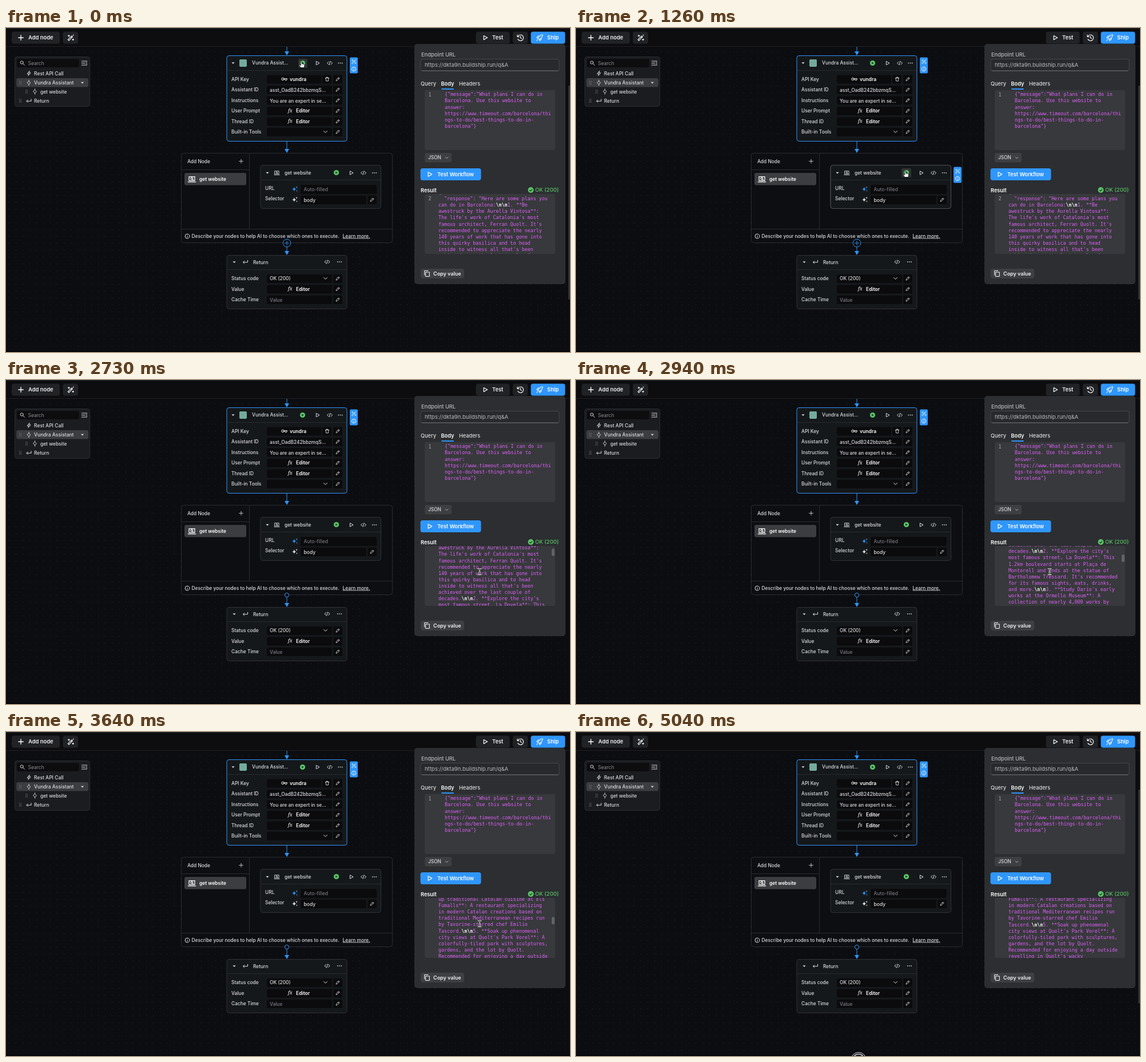
Write an HTML page that moves like this. It is 986x568 px and loops after 5110 ms.

```html
<!DOCTYPE html>
<html lang="en">
<head>
<meta charset="utf-8">
<title>Workflow editor</title>
<style>
html, body { margin: 0; width: 100%; height: 100%; overflow: hidden; background: #0c0d10; }
svg { display: block; width: 100vw; height: 100vh; }
text { font-family: Inter, sans-serif; white-space: pre; }
.mono { font-family: "DejaVu Sans Mono", monospace; }
.serif { font-family: "Noto Serif", serif; font-style: italic; }
.icon { fill: none; stroke-linecap: round; stroke-linejoin: round; }
</style>
</head>
<body>
<svg id="stage" viewBox="0 0 986 568"></svg>
<script>
const BLUE = '#2f96fb', GREEN = '#5ac466', LINE = '#292b2f', NODE = '#15181a',
      FIELD = '#0b0b0e', TEXT = '#dcdde0', PINK = '#dc60f8';

const ICONS = {
  play: 'M-2.3-3L3 0-2.3 3Z',
  code: 'M-2-2.5L-4.5 0-2 2.5M2-2.5L4.5 0 2 2.5M.8-3.2L-.8 3.2',
  chevron: 'M-3-1.5L0 1.5 3-1.5',
  pencil: 'M-3 3L-2.5 .9 1.6-3.2 3.2-1.6-.9 2.5ZM.4-2L2-.4',
  plus: 'M-4 0H4M0-4V4',
  wand: 'M-4.5 3.3L1.8-3 3.3-1.5-3 4.8ZM.3-1.5L1.8 0M-3-4.5V-1.9M-4.3-3.2H-1.7M4 2V4.4M2.8 3.2H5.2M4.4-5V-3.6',
  history: 'M-4.6-1.5A4.9 4.9 0 1 1-4.3 2.5M-5.2-4.6V-1.4H-2M0-2.6V.3L2 1.5',
  rocket: 'M-2.8.6C-.8-3.6 2-5 5-5 5-2 3.6.8-.6 2.8ZM-2.8.6L-5 .3-3-2.6H-.9M-.6 2.8L-.3 5 2.6 3V.9M-3.2 2.6L-5 5M1.5-1.6h.1',
  search: 'M1.3-1A2.6 2.6 0 1 1-3.9-1A2.6 2.6 0 1 1 1.3-1M.7 1L3.5 3.8',
  fold: 'M-4.5-3.4H4.5M-4.5 0H1M-4.5 3.4H4.5M4.7-1.7L2.8 0 4.7 1.7',
  bolt: 'M1-4L-3 .8H-.3L-1 4 3-.8H.3Z',
  diamond: 'M0-2.8L2.8 0 0 2.8-2.8 0ZM0-4.7V-2.8M0 2.8V4.7',
  enter: 'M4-2.8V.7H-4M-1.8-1.5L-4 .7-1.8 2.9',
  laptop: 'M-4-3.6H4V2H-4ZM-5.3 3.8H5.3M1.2-1A1.4 1.4 0 1 1-1.6-1A1.4 1.4 0 1 1 1.2-1M.8 0L2 1.1',
  trash: 'M-2.4-1.8L-2 3.4H2L2.4-1.8M-3.2-1.9H3.2M-1-1.9V-3.3H1V-1.9',
  key: 'M-.4 0A2.2 2.2 0 1 1-4.8 0A2.2 2.2 0 1 1-.4 0M-.4-.9H4.8V.9H3.8V2.2H2.2V.9H-.4M-2.6 0h.1',
  info: 'M4 0A4 4 0 1 1-4 0A4 4 0 1 1 4 0M0-.3V2M0-2h.01',
  copy: 'M-2-2.5H4.2V5H-2ZM-4.4 2.6V-5H1.8'
};
const FILLED = {
  caret: 'M-2.6-1.2H2.6L0 1.6Z',
  dots: 'M-4-.8h1.6v1.6h-1.6ZM-.8-.8h1.6v1.6h-1.6ZM2.4-.8h1.6v1.6h-1.6Z',
  grip: 'M-1.8-3h1.2v1.2h-1.2ZM.6-3h1.2v1.2H.6ZM-1.8-.6h1.2V.6h-1.2ZM.6-.6h1.2V.6H.6ZM-1.8 1.8h1.2V3h-1.2ZM.6 1.8h1.2V3H.6Z',
  sparkle: 'M-1.2-3.6Q-.7 0 2.6.6-.7 1.2-1.2 4.6-1.7 1.2-5 .6-1.7 0-1.2-3.6ZM3-4.8Q3.2-3 4.8-2.8 3.2-2.6 3-.8 2.8-2.6 1.2-2.8 2.8-3 3-4.8ZM3.3 2Q3.4 3.2 4.6 3.4 3.4 3.6 3.3 4.8 3.2 3.6 2 3.4 3.2 3.2 3.3 2Z'
};

const esc = s => s.replace(/&/g, '&amp;').replace(/</g, '&lt;');
const text = (x, yc, s, size = 8.4, weight = 500, fill = TEXT, extra = '') =>
  `<text x="${x}" y="${yc + size * .36}" font-size="${size}" font-weight="${weight}" fill="${fill}" ${extra}>${esc(s)}</text>`;
const rect = (x, y, r, b, fill, radius = 0, stroke = 'none') => {
  const inset = stroke === 'none' ? 0 : .5;
  return `<rect x="${x + inset}" y="${y + inset}" width="${r - x - 2 * inset}" height="${b - y - 2 * inset}" rx="${radius}" fill="${fill}" stroke="${stroke}"/>`;
};
const icon = (name, x, y, color = TEXT, scale = 1, width = 1) => {
  const at = `transform="translate(${x} ${y}) scale(${scale})"`;
  return FILLED[name] ? `<path ${at} d="${FILLED[name]}" fill="${color}"/>`
    : `<path class="icon" ${at} d="${ICONS[name]}" stroke="${color}" stroke-width="${width}"/>`;
};
const stroke = (d, color = LINE, width = 1) => `<path d="${d}" fill="none" stroke="${color}" stroke-width="${width}"/>`;
const group = (id, body, attrs = '') => `<g id="${id}" ${attrs}>${body}</g>`;
const arrow = (from, to) => stroke(`M491 ${from}V${to - 5}`, BLUE) +
  `<path d="M487 ${to - 7}h8l-4 7Z" fill="${BLUE}"/>`;
const code = (x, yc, line) => {
  const parts = esc(line).split('\\n\\n').join('<tspan fill="#fff" font-weight="700">\\n\\n</tspan>');
  return `<text class="mono" x="${x}" y="${yc + 3}" font-size="8.36" fill="${PINK}">${parts}</text>`;
};
const lineNumber = (y, n) => text(738.5, y, n, 8.36, 400, '#a9aaad', 'class="mono"');
const runButton = (x, y) => `<circle cx="${x}" cy="${y}" r="4.6" fill="${GREEN}"/>` +
  `<path d="M${x - 1.3} ${y - 2.1}l3.5 2.1-3.5 2.1Z" fill="#12321a"/>`;
const pencilButton = y0 => x0 => rect(x0, y0 - 7, x0 + 16, y0 + 8, FIELD, 2) + icon('pencil', x0 + 8, y0, TEXT, .95, .9);
const sideTools = (x, y) => rect(x, y - .5, x + 14, y + 27.5, BLUE, 2) +
  icon('wand', x + 7, y + 7, '#fff', .75) + icon('info', x + 7, y + 20, '#fff', .9);

function fieldRow(y, label, kind, value) {
  let out = text(394, y, label) + rect(456, y - 7, kind === 'key' ? 551 : 570, y + 8, FIELD, 2) + pencilButton(y)(572);
  if (kind === 'key') {
    out += icon('key', 486.5, y, '#fff', 1, .9) + text(496, y, value, 8.6, 600, '#fff') +
      rect(553, y - 7, 569, y + 8, FIELD, 2) + icon('trash', 561.5, y, TEXT, 1, .9);
  } else if (kind === 'editor') {
    out += text(493, y - .5, 'fx', 9, 400, '#fff', 'class="serif"') + text(507, y, 'Editor', 8.5, 600, '#fff');
  } else {
    out += text(461, y + (kind === 'select' ? 0 : 1), value, 8.4, 500, kind === 'empty' ? '#7c7e83' : TEXT);
  }
  return kind === 'select' ? out + icon('chevron', 558.5, y) : out;
}

function topBar() {
  return rect(0, 0, 986, 33, '#0d0d10') + rect(0, 0, 986, 1, '#292a2e') + rect(0, 32, 986, 33, '#202125') +
    rect(10, 6.5, 94, 27.5, '#202225', 4) + icon('plus', 26, 17, '#fff', 1.05, 1.3) + text(39, 17, 'Add node', 9.4, 600, '#f2f2f4') +
    rect(99.5, 6.5, 126, 27.5, '#202225', 4) + icon('wand', 113, 17, '#fff', 1.05, 1.1) +
    rect(821.5, 6.5, 880.5, 27.5, '#202225', 4) + icon('play', 838, 17, '#fff', 1.2) + text(850, 17, 'Test', 9.3, 600, '#f2f2f4') +
    rect(886, 6.5, 912.5, 27.5, '#202225', 4) + icon('history', 899.5, 17, '#fff', 1.05, 1.1) +
    rect(917.5, 6.5, 977.5, 27.5, BLUE, 4) + icon('rocket', 933, 17, '#fff', 1.05) + text(946, 17, 'Ship', 9.5, 600, '#fff');
}

function outline() {
  return rect(15, 50, 147, 138, '#1a1c1f', 4, '#2b2d31') + rect(19, 54, 128, 69, '#0d0d10', 3) +
    icon('search', 29, 61.5) + text(38.5, 61.5, 'Search', 8.5, 400, '#8d8f94') + icon('fold', 137, 61.5) +
    rect(18, 88, 144, 103.5, '#3b3d40', 3) +
    icon('bolt', 40, 79.5) + text(49, 79.5, 'Rest API Call', 8.5) +
    icon('grip', 25, 96, '#77797e') + icon('diamond', 40, 96) + text(49, 95.5, 'Vundra Assistant', 8.5) + icon('caret', 133.5, 96) +
    icon('grip', 36, 111.5, '#77797e') + icon('diamond', 50.5, 111.5) + text(60, 111.5, 'get website', 8.4) +
    icon('grip', 25, 127.5, '#77797e') + icon('enter', 40, 127.5) + text(49, 127.5, 'Return', 8.4);
}

function assistantNode() {
  return rect(385.5, 48, 596.5, 199, NODE, 4, BLUE) + stroke('M386.5 74.5H595.5') +
    icon('caret', 397, 61.5) + rect(408, 55, 421, 68, '#74aa9c', 2) + text(430, 61, 'Vundra Assist...', 8.4) +
    group('hover1', rect(511, 54, 527, 70, '#303235', 2)) + runButton(518.5, 61.5) +
    icon('play', 545, 61.5) + icon('code', 566, 61.5) + icon('dots', 584.5, 61.5) +
    fieldRow(89.5, 'API Key', 'key', 'vundra') +
    fieldRow(108, 'Assistant ID', 'value', 'asst_OadB242bbzmqS...') +
    fieldRow(126.5, 'Instructions', 'value', 'You are an expert in se...') +
    fieldRow(145, 'User Prompt', 'editor') + fieldRow(163.5, 'Thread ID', 'editor') +
    fieldRow(182, 'Built-in Tools', 'select', '') + sideTools(601, 52);
}

function toolGroup() {
  return rect(306, 219, 676, 377, '#0d0e11', 4, LINE) + stroke('M425.5 219V352M307 248.5H425M307 352.5H675') +
    text(317, 233.5, 'Add Node') + icon('plus', 411, 233.5, TEXT, .85) +
    rect(312, 254, 420, 275.5, '#3b3d40', 3) + icon('laptop', 325, 265, '#fff', 1.25) + text(338, 264.5, 'get website', 8.4, 600, '#fff') +
    rect(444.5, 240, 656, 317, NODE, 4, '#303236') +
    group('nodeHover', rect(444.5, 240, 656, 317, 'none', 4, '#4c4f54') + sideTools(660, 244)) +
    stroke('M446 266.5H655') + icon('caret', 457, 254) + icon('laptop', 473.5, 254, TEXT, .9) + text(487, 253.5, 'get website') +
    group('hover2', rect(569, 246, 586, 262, '#303235', 2)) + runButton(577.5, 253.5) +
    icon('play', 604, 254) + icon('code', 625, 254) + icon('dots', 644, 254) +
    text(453, 280.5, 'URL') + icon('sparkle', 505, 282, BLUE) + rect(515, 275, 648, 291, FIELD, 2) +
    text(520.5, 283, 'Auto-filled', 8.6, 400, '#85878c') +
    text(453, 299, 'Selector') + icon('sparkle', 505, 300.5) + rect(515, 294, 630, 309, FIELD, 2) + text(520.5, 301.5, 'body', 8.6) +
    pencilButton(301)(632) +
    icon('info', 317, 365) + text(324.5, 364.5, 'Describe your nodes to help AI to choose which ones to execute.', 8.35) +
    text(588.5, 364.5, 'Learn more.', 8.35, 500, TEXT, 'text-decoration="underline"');
}

function returnNode() {
  return rect(385.5, 398, 596.5, 493, NODE, 4, '#303236') + stroke('M387 423.5H596') +
    icon('caret', 399, 410.5) + icon('enter', 418.5, 410) + text(432, 410.5, 'Return') + icon('code', 561.5, 410) + icon('dots', 583, 410) +
    fieldRow(439, 'Status code', 'select', 'OK (200)') + fieldRow(457.5, 'Value', 'editor') +
    fieldRow(476, 'Cache Time', 'empty', 'Value');
}

const REQUEST = `{"message":"What plans I can do in
Barcelona. Use this website to
answer:
https://www.timeout.com/barcelona/thi
ngs-to-do/best-things-to-do-in-
barcelona"}`.split('\n');

const RESPONSE = String.raw`{
  "response": "Here are some plans you
can do in Barcelona:\n\n1. **Be
awestruck by the Aurella Vintosa**:
The life's work of Catalonia's most
famous architect, Ferran Quolt. It's
recommended to appreciate the nearly
140 years of work that has gone into
this quirky basilica and to head
inside to witness all that's been
achieved over the last couple of
decades.\n\n2. **Explore the city's
most famous street, La Dovela**: This
1.2km boulevard starts at Plaça de
Montorell and ends at the statue of
Bartholomew Tressard. It's recommended
for its famous sights, eats, drinks,
and more.\n\n3. **Study Dario's early
works at the Ormello Museum**: A
collection of nearly 4,000 works by
Dario Ormello showcasing the artist's
formative years and the evolution of
his style.\n\n4. **Stop by and fill
up traditional Catalan cuisine at Els
Fumalls**: A restaurant specializing
in modern Catalan creations based on
traditional Mediterranean recipes run
by Tavorine-starred chef Emilio
Tascord.\n\n5. **Soak up phenomenal
city views at Quolt's Park Vorel**: A
colorfully-tiled park with sculptures,
gardens, and the lot by Quolt.
Recommended for enjoying a day outside
revelling in Quolt's wacky
architecture.`.split('\n');

function testPanel() {
  const pitch = 11.13;
  const response = RESPONSE.map((line, i) => code(756, 299 + pitch * (i - 1), line)).join('') +
    lineNumber(299 - pitch, '1') + lineNumber(299, '2');
  return rect(714, 28, 978, 449, '#2c2e31', 5) +
    text(726, 46.5, 'Endpoint URL', 9.3, 500, '#b6b8bc') + rect(724.5, 54, 967.5, 75.5, '#27292c', 3, '#45474b') +
    stroke('M727 75H965.5', '#6c6e73') + text(732, 65, 'https://dkta9n.buildship.run/q&A', 9.5, 400, '#b9bbbf') +
    text(725, 97.5, 'Query', 9.2, 500) + text(760.5, 97.5, 'Body', 9.2, 600, '#fff') + text(792, 97.5, 'Headers', 9.2, 500) +
    rect(761, 106, 783, 108, BLUE, 1) + rect(732, 109, 960, 214, '#38393c', 3) + lineNumber(116.5, '1') +
    REQUEST.map((line, i) => code(767, 116.3 + 11.1 * i, line)).join('') +
    rect(732, 219, 779, 235.5, '#3d3f43', 3) + text(738, 227.5, 'JSON', 8.3, 500) + icon('chevron', 770.5, 227.5, TEXT, .75) +
    rect(724.5, 246, 830.5, 267, BLUE, 4) + icon('play', 741, 256.5, '#fff', 1.25) + text(754, 256.5, 'Test Workflow', 9.2, 600, '#fff') +
    text(725, 284.5, 'Result', 9.2, 600, '#fff') + `<circle cx="917.5" cy="284" r="5" fill="${GREEN}"/>` +
    stroke('M915.2 284.1l1.7 1.7 3-3.2', '#1d2b20', 1.2) + text(925, 284, 'OK (200)', 9.5, 500, GREEN) +
    rect(732, 291, 960, 396, '#38393c', 3) +
    `<clipPath id="resultClip"><rect x="732" y="291" width="228" height="105"/></clipPath>` +
    `<g clip-path="url(#resultClip)">${group('response', response)}</g>` +
    group('thumb', rect(954, 292, 959, 305, '#626366', 2)) +
    rect(725, 422, 801, 439, '#3d3f43', 4) + icon('copy', 736, 430.5, '#fff') + text(747, 431, 'Copy value', 9, 600, '#f2f2f4');
}

const cursors =
  group('hand', '<path d="M-1 1C-1-.4 1-.4 1 1V4.3L4.3 5C5.5 5.3 5.7 6.1 5.5 7.2L4.8 11H-1.2L-3.6 7.4C-4.3 6.2-3.2 5.4-2.4 6.1L-1 7.3Z" fill="#fff" stroke="#000" stroke-width=".8"/>') +
  group('pointer', '<path d="M0 0V10.5L2.4 8.3 4 12 5.8 11.2 4.2 7.6H7.4Z" fill="#000" stroke="#fff" stroke-width=".9"/>') +
  group('beam', ['#fff', '#111'].map((c, i) =>
    `<path class="icon" d="M-2.4-5Q0-5 0-3.4 0-5 2.4-5M0-3.4V3.4M-2.4 5Q0 5 0 3.4 0 5 2.4 5M-1.2 1.3H1.2" stroke="${c}" stroke-width="${i ? .8 : 2}"/>`).join(''));

document.getElementById('stage').innerHTML =
  `<pattern id="dots" width="12" height="12" patternUnits="userSpaceOnUse"><rect x="5" y="5" width="1" height="1" fill="#2a2b30"/></pattern>` +
  rect(0, 0, 986, 568, '#0c0d10') + rect(0, 33, 986, 566, 'url(#dots)') + rect(0, 566, 986, 568, '#060608') +
  topBar() + outline() + arrow(33, 48) + assistantNode() + arrow(199, 219) + toolGroup() + arrow(377, 398) +
  `<circle id="joint" cx="491" cy="377" fill="#0d0e11" stroke="${BLUE}"/>` +
  group('jointPlus', icon('plus', 491, 377, BLUE, .9)) + returnNode() +
  group('pageBar', rect(983, 101, 986, 476, '#303236', 1)) + testPanel() +
  group('ring', '<circle cx="494" cy="575" r="13.3" fill="#0c0c0f" stroke="#e8e8ea"/><circle cx="494" cy="575" r="10.3" fill="#18191c" stroke="#e8e8ea" stroke-width="1.3"/>') +
  group('cursor', cursors);

const el = id => document.getElementById(id);
const show = (id, on) => el(id).setAttribute('visibility', on ? 'visible' : 'hidden');
const move = (id, x, y) => el(id).setAttribute('transform', `translate(${x} ${y})`);

const STEP = 70, LOOP = 5110;
const START = [516.5, 58.5];
// first step, last step, destination x, y
const LEGS = [[1, 4, 517.5, 58.8], [6, 13, 584, 250.5], [14, 18, 576, 250.5], [22, 28, 828, 336], [61, 68, 496, 565]];
// step, scroll offset
const SCROLL = [[34, 0], [35, 1.5], [37, 9], [39, 27], [41, 88], [42, 110], [43, 121], [48, 121],
                [49, 122.4], [50, 155], [51, 213], [52, 251], [53, 259], [54, 262]];

function cursorAt(step) {
  let [x, y] = START;
  for (const [first, last, toX, toY] of LEGS) {
    const p = Math.min(1, Math.max(0, (step - first + 1) / (last - first + 1)));
    const eased = p * p * (3 - 2 * p);
    x += (toX - x) * eased;
    y += (toY - y) * eased;
  }
  return [x, y];
}

function scrollAt(step) {
  const next = SCROLL.findIndex(([s]) => s >= step);
  if (next < 0) return SCROLL[SCROLL.length - 1][1];
  if (next === 0) return 0;
  const [s0, v0] = SCROLL[next - 1], [s1, v1] = SCROLL[next];
  return v0 + (v1 - v0) * (step - s0) / (s1 - s0);
}

function render(time) {
  const step = Math.floor((time % LOOP) / STEP);
  const [x, y] = cursorAt(step), scroll = scrollAt(step);
  const over = (l, t, r, b) => x >= l && x <= r && y >= t && y <= b;
  const run1 = over(511, 54, 527, 70), run2 = over(569, 246, 586, 262);
  const inPanel = over(714, 28, 978, 449), inResult = over(732, 291, 960, 396);
  const canAdd = step < 40 && !inPanel, visible = step < 69;

  move('cursor', x, y);
  show('hand', visible && (run1 || run2));
  show('beam', visible && inResult);
  show('pointer', visible && !run1 && !run2 && !inResult);
  show('hover1', run1);
  show('hover2', run2);
  show('nodeHover', over(445, 240, 674, 317));
  show('jointPlus', canAdd);
  el('joint').setAttribute('r', canAdd ? 6.8 : 3.6);
  show('pageBar', !inPanel);
  show('thumb', inResult);
  move('thumb', 0, scroll * .128);
  move('response', 0, -scroll);
  show('ring', step >= 72);
}

const began = performance.now();
function frame() {
  render(performance.now() - began);
  requestAnimationFrame(frame);
}
frame();
</script>
</body>
</html>
```
